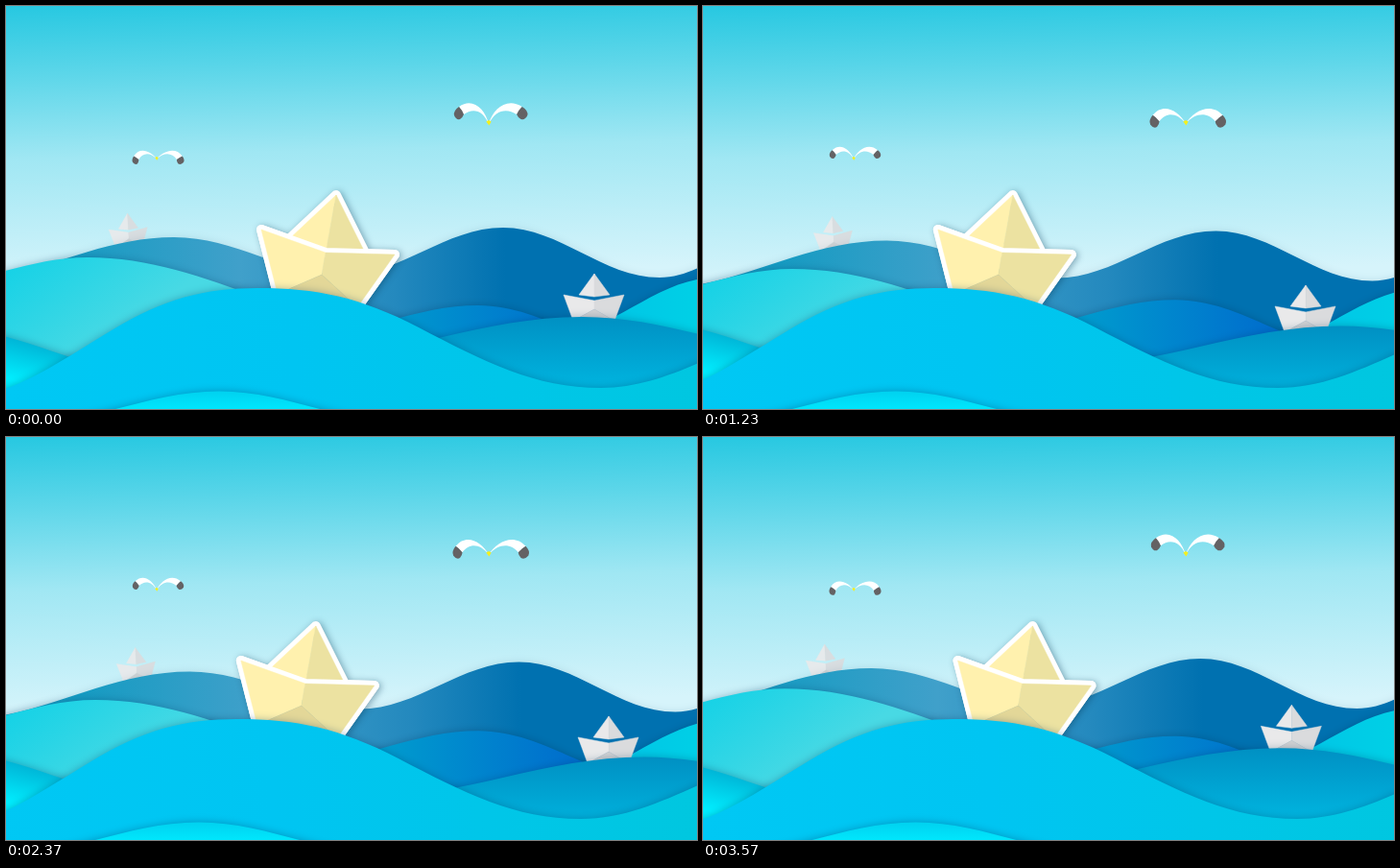
An HTML page with a canvas for the animation above (3600 ms loop, 720 px wide and 420 px high).

```html
<!DOCTYPE html>
<html lang="en">
<head>
<meta charset="utf-8">
<title>Paper boats</title>
<style>
html, body { margin: 0; width: 100%; height: 100%; overflow: hidden; }
canvas { display: block; width: 720px; height: 420px; }
</style>
</head>
<body>
<canvas id="stage" width="720" height="420"></canvas>
<script>
const ctx = document.getElementById('stage').getContext('2d');
const LOOP = 3600, STEP = 30;
const SINE_HANDLE = 0.3642; // Bezier handle length that imitates half a sine

function gradient(x0, y0, x1, y1, ...stops) {
  const g = ctx.createLinearGradient(x0, y0, x1, y1);
  stops.forEach(([at, color]) => g.addColorStop(at, color));
  return g;
}

// Swell through crests and troughs; each key is [x, y, slope = 0].
function swell(...keys) {
  const path = new Path2D();
  const last = keys[keys.length - 1];
  path.moveTo(keys[0][0], 480);
  path.lineTo(keys[0][0], keys[0][1]);
  keys.slice(1).forEach(([x, y, slope = 0], i) => {
    const [px, py, pSlope = 0] = keys[i];
    const h = (x - px) * SINE_HANDLE;
    path.bezierCurveTo(px + h, py + h * pSlope, x - h, y - h * slope, x, y);
  });
  path.lineTo(last[0], 480);
  path.closePath();
  return path;
}

const sky = gradient(0, 0, 8, 290,
  [0, '#27c8e1'], [0.25, '#5cd6e9'], [0.55, '#a0e7f3'], [1, '#d6f4fb']);

// dx, dy: how far each wave drifts in half a loop.
const backWave = {
  dx: 24, dy: 5, shadow: 0.12,
  fill: gradient(60, 0, 520, 0,
    [0, '#159bc2'], [0.4, '#40a0ca'], [0.75, '#2489be'], [1, '#0071b0']),
  path: swell([-70, 292], [175, 241], [352, 280], [518, 231], [681, 283], [800, 244])
};
const leftCyan = {
  dx: 12, dy: 17.5, shadow: 0.3,
  fill: gradient(20, 262, 90, 360, [0, '#17d2e6'], [1, '#48d9e4']),
  path: swell([-90, 291], [85, 262], [440, 345])
};
const rightCyan = {
  dx: 12, dy: 17.5, shadow: 0.3,
  fill: gradient(630, 0, 720, 0, [0, '#00c6e6'], [1, '#00d0e6']),
  path: swell([565, 345], [740, 283])
};
const leftPool = {
  dx: 2, dy: -10, shadow: 0.35,
  fill: gradient(10, 346, 0, 388, [0, '#00b4d6'], [1, '#00eeff']),
  path: swell([-80, 333], [190, 391])
};
const midWave = {
  dx: 0, dy: -8.5, shadow: 0.35,
  fill: gradient(390, 0, 590, 0, [0, '#009cce'], [1, '#006ecd']),
  path: swell([310, 343], [492, 312], [690, 368])
};
const tealWave = {
  dx: 95, dy: 14, shadow: 0.3,
  fill: gradient(0, 324, 0, 395, [0, '#0090c3'], [1, '#00b3de']),
  path: swell([310, 366], [600, 324], [860, 364])
};
const frontWave = {
  dx: -31, dy: 0, shadow: 0.32,
  fill: gradient(0, 0, 750, 0, [0, '#00c8f4'], [0.4, '#00c5f2'], [1, '#00c7df']),
  path: swell([-60, 410], [110, 338, -0.6], [262, 294], [430, 335, 0.52], [620, 398], [860, 330])
};
const bottomWave = {
  dx: -31, dy: 0, shadow: 0.35,
  fill: gradient(0, 402, 0, 424, [0, '#00d2f0'], [1, '#00ebff']),
  path: swell([28, 433], [222, 401.5], [415, 434])
};

function drawWave({ dx, dy, shadow, fill, path }, u) {
  ctx.save();
  ctx.translate(dx * u, dy * u);
  ctx.shadowColor = `rgba(0, 50, 90, ${shadow})`;
  ctx.shadowBlur = 9;
  ctx.fillStyle = fill;
  ctx.fill(path);
  ctx.restore();
}

function polygon(...pts) {
  const path = new Path2D();
  pts.forEach(p => path.lineTo(...p));
  path.closePath();
  return path;
}

// sail: top, left, middle, right; hull: left, dip, right, bottom right, bottom left.
function paperBoat(sail, hull, keel, [light, shade, base]) {
  const [top, sl, sm, sr] = sail, [hl, dip, hr, br, bl] = hull;
  return {
    sail: polygon(...sail),
    hull: polygon(...hull),
    sailFacets: [[light, polygon(top, sl, sm)], [shade, polygon(top, sm, sr)]],
    hullFacets: [
      [light, polygon(hl, dip, keel, bl)],
      [shade, polygon(dip, hr, br, keel)],
      [base, polygon(keel, br, bl)]]
  };
}

function drawFacets(list) {
  ctx.lineWidth = 0.5;
  for (const [color, path] of list) {
    ctx.fillStyle = ctx.strokeStyle = color;
    ctx.fill(path);
    ctx.stroke(path);
  }
}

const yellowBoat = paperBoat(
  [[344, 197], [296, 242], [334, 253], [374, 257]],
  [[266, 233], [333, 257], [405, 259], [366, 314], [283, 300]],
  [329, 280], ['#fff1ae', '#ece2a1', '#e3d798']);

const greyBoat = paperBoat(
  [[0, 0], [-16, 22], [0, 24], [16, 22]],
  [[-32, 22], [0, 28], [31, 22], [21, 49], [-22, 49]],
  [0, 37], ['#e9e9ea', '#dadbdd', '#d0d1d3']);

function strokeRim(path) {
  ctx.strokeStyle = '#fff';
  ctx.lineWidth = 10;
  ctx.lineJoin = 'round';
  ctx.stroke(path);
}

function drawYellowBoat(u) {
  const rim = new Path2D(yellowBoat.sail);
  rim.addPath(yellowBoat.hull);
  ctx.save();
  ctx.translate(-31 * u, 0);
  ctx.save();
  ctx.shadowColor = 'rgba(0, 50, 80, 0.4)';
  ctx.shadowBlur = 7;
  ctx.shadowOffsetX = 2;
  ctx.shadowOffsetY = 1;
  strokeRim(rim);
  ctx.restore();
  drawFacets(yellowBoat.sailFacets);
  strokeRim(yellowBoat.hull);
  drawFacets(yellowBoat.hullFacets);
  ctx.restore();
}

function drawGreyBoat(x, y, sx, sy, tilt, alpha) {
  ctx.save();
  ctx.translate(x, y);
  ctx.rotate(tilt);
  ctx.scale(sx, sy);
  ctx.globalAlpha = alpha;
  drawFacets(greyBoat.sailFacets);
  drawFacets(greyBoat.hullFacets);
  ctx.restore();
}

const feather = new Path2D('M0 1C-4-15-17-27-31-17L-26-9C-17-16-6-14 0 1Z');
const wingTip = new Path2D('M-31-17Q-37-13-36-8Q-34-3-30-4Q-27-6-26-9Q-28-14-31-17Z');

function drawBird(x, y, size, droop) {
  ctx.save();
  ctx.translate(x, y);
  ctx.scale(size, size);
  for (const side of [1, -1.12]) {
    ctx.save();
    ctx.scale(side, 1);
    ctx.rotate(-droop * Math.PI / 8);
    ctx.fillStyle = '#fff';
    ctx.fill(feather);
    ctx.fillStyle = '#646264';
    ctx.fill(wingTip);
    ctx.restore();
  }
  ctx.fillStyle = '#f4f01e';
  ctx.fill(polygon([-2.6, -1.5], [0, -3], [2.6, -1.5], [0.4, 2.5]));
  ctx.restore();
}

function draw(now) {
  const t = Math.floor((now % LOOP) / STEP) * STEP;
  const u = 1 - Math.abs(1 - 2 * t / LOOP);

  ctx.fillStyle = sky;
  ctx.fillRect(0, 0, 720, 420);
  drawBird(503, 122, 1, u);
  drawBird(157, 159, 0.68, 1 - u);
  drawGreyBoat(126.5 + 12 * u, 216 + 5 * u, 0.64, 0.72, -0.06, 0.92);
  for (const w of [backWave, leftCyan, rightCyan, leftPool, midWave]) drawWave(w, u);
  drawGreyBoat(613 + 22 * u, 279 + 17.5 * u, 1, 1, 0, 1);
  drawWave(tealWave, u);
  drawYellowBoat(u);
  drawWave(frontWave, u);
  drawWave(bottomWave, u);
}

function tick() {
  draw(performance.now());
  requestAnimationFrame(tick);
}
tick();
</script>
</body>
</html>
```
